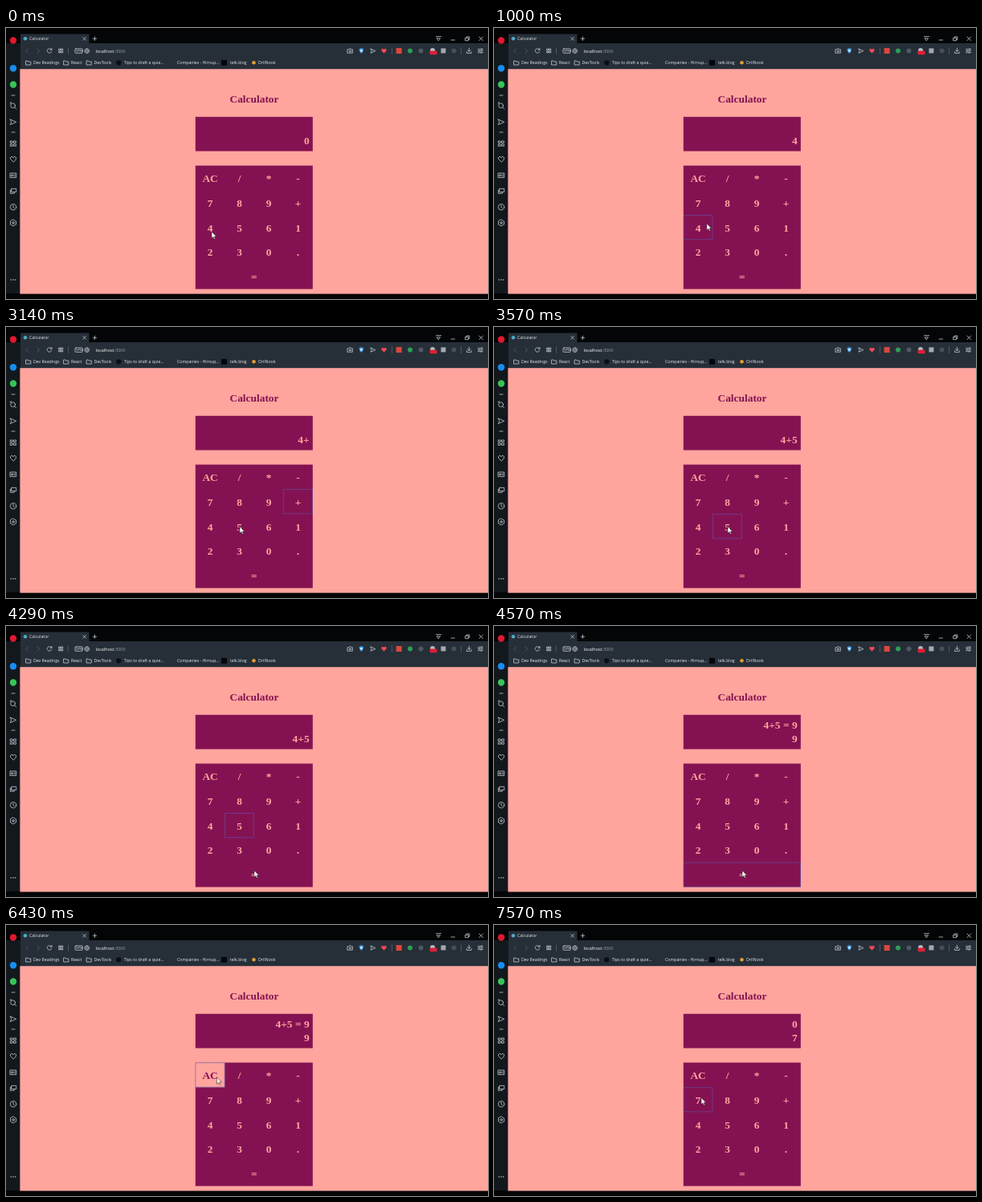
Write an HTML page that moves like this. It is 600 px wide and 338 px high and loops after 8 s.

```html
<!DOCTYPE html>
<html lang="en">
<head>
<meta charset="utf-8">
<title>Calculator</title>
<style>
html, body { margin: 0; width: 100%; height: 100%; overflow: hidden; background: #000; }
svg { display: block; width: 600px; height: 338px; }
.ui { font: 5.2px "Open Sans", "Noto Sans", sans-serif; fill: #e6e9ed; }
.calc { font: bold 13.4px "Liberation Serif", "Noto Serif", serif; }
.line { fill: none; stroke: #c3c8cf; stroke-width: .8; stroke-linejoin: round; stroke-linecap: round; }
.dim { stroke: #56606a; }
</style>
</head>
<body>
<svg id="stage" viewBox="0 0 600 338" xmlns="http://www.w3.org/2000/svg">
  <rect width="600" height="338" fill="#030506"/>
  <path d="M18 7.500h85.500V19H600v33H18z" fill="#262f38"/>
  <rect y="19" width="18" height="312" fill="#13181d"/>
  <rect x="17.400" y="51.200" width="582.600" height="280.400" fill="#ffa59e"/>

  <!-- tab strip and window buttons -->
  <circle cx="9" cy="15.500" r="4.200" fill="#e0182f"/>
  <circle cx="24" cy="13.300" r="2.300" fill="#4fa9c4"/>
  <text class="ui" x="29" y="15.200">Calculator</text>
  <g class="line">
    <path d="M95.800 11.600l3.600 3.600m0-3.600l-3.600 3.600M108.300 13.300h4.400m-2.200-2.200v4.400"/>
    <path d="M535.500 10.600h6M536.500 12.800h4l-2 2.800z"/>
    <path d="M554 15h4.600M572 12.300h3.600v3.400H572zM573.300 12.200v-1.300h3.600v3.500h-1.200M589 11l4.600 4.600m0-4.600l-4.600 4.600"/>
  </g>

  <!-- address bar -->
  <g class="line">
    <path class="dim" d="M27.300 25.800l-2.600 2.600 2.600 2.600M39 25.800l2.600 2.600-2.600 2.600"/>
    <path d="M56.600 27a2.800 2.800 0 1 0 .2 2.400M57 25.400v1.900h-1.900"/>
    <path d="M66 26h1.800v1.800H66zM69 26h1.800v1.800H69zM66 29h1.800v1.800H66zM69 29h1.800v1.800H69z"/>
    <path class="dim" d="M77.500 25v7M480.500 24.500v8M566.500 24.500v8"/>
    <rect x="86" y="25.900" width="9.400" height="5.400" rx="1"/>
    <circle cx="100.800" cy="28.600" r="2.800"/>
    <path d="M98 28.600h5.600M100.800 25.800q-2.400 2.800 0 5.600q2.400-2.800 0-5.600" stroke-width=".5"/>
    <path d="M425.300 26.800h1.400l.7-1h1.800l.7 1h1.500v4.400h-6.100z"/>
    <circle cx="428.300" cy="28.900" r="1.100"/>
    <path d="M454 26l5.800 2.600-5.800 2.600 1-2.600z"/>
    <path d="M576.400 25.200v4m-1.800-1.600l1.800 1.800 1.800-1.800M573.600 29.600v1.800h5.600v-1.800"/>
    <path d="M587.600 26.400h6M587.600 28.500h6M587.600 30.600h6M592 25.700v1.400M589 27.800v1.400M591.500 29.900v1.400"/>
  </g>
  <text class="ui" x="87.200" y="30.200" style="font-size:4px">VPN</text>
  <text class="ui" x="111.500" y="30.600" style="font-size:5.500px; fill:#fff">localhost<tspan fill="#98a0a8">:3000</tspan></text>
  <path d="M439.600 26l2.700-1 2.700 1q.2 4-2.700 5.800q-2.900-1.800-2.700-5.800z" fill="#3f9be0"/>
  <circle cx="442.300" cy="28.200" r="1.300" fill="#e8f2fb"/>
  <path d="M470.500 31.400l-3-3q-.8-2 1.100-2.600q1.300-.1 1.900 1.100q.6-1.200 1.900-1.100q1.900.6 1.100 2.600z" fill="#f04a58"/>
  <rect x="485.600" y="25" width="7" height="7" fill="#d9483c"/>
  <circle cx="503" cy="28.500" r="3" fill="#2f9e55"/>
  <circle cx="516.500" cy="28.500" r="3" fill="#4f5862"/>
  <circle cx="531" cy="28" r="3" fill="#b7bac2"/>
  <rect x="527.500" y="28.600" width="9" height="4.600" rx="1" fill="#dd2034"/>
  <rect x="541.400" y="25.400" width="6" height="6" fill="#a5a9b0"/>
  <circle cx="557.500" cy="28.500" r="3" fill="#444e58"/>

  <!-- bookmarks -->
  <g id="marks"></g>
  <circle cx="140.300" cy="43.300" r="3.100" fill="#0a0d12"/>
  <rect x="268" y="39.800" width="7" height="7" fill="#05070a"/>
  <circle cx="308.500" cy="43.300" r="2.300" fill="#e39a36"/>

  <!-- sidebar -->
  <circle cx="9" cy="50.300" r="4.200" fill="#168df0"/>
  <circle cx="9" cy="70.500" r="4.200" fill="#38c456"/>
  <g class="line">
    <path d="M7 84h4M7 130h4"/>
    <circle cx="8.600" cy="96.800" r="2.900"/><path d="M10.700 98.900l2 2M5.400 94v-1h1.500"/>
    <path d="M5.300 114l7.400 3.300-7.400 3.300 1.300-3.300z"/>
    <path d="M5.600 141h2.500v2.300H5.600zM9.900 141h2.500v2.300H9.900zM5.600 145h2.500v2.300H5.600zM9.900 145h2.500v2.300H9.900z"/>
    <path d="M9 167l-3.400-3.400q-1-2.500 1.300-3.200q1.600 0 2.100 1.500q.5-1.500 2.100-1.500q2.300.7 1.300 3.200z"/>
    <path d="M5.400 181h7.300v5.600H5.400zM7 183h1.800v1.700H7zM10.300 183h1M10.300 184.700h1"/>
    <path d="M7 200.400h5.700v4.200H7zM7 202.300H5.300v4h5v-1.600"/>
    <circle cx="9" cy="223.300" r="3.700"/><path d="M9 221v2.500l1.500 1"/>
    <path d="M9 239l3.500 2v4L9 247l-3.500-2v-4z"/><circle cx="9" cy="243" r="1.300"/>
  </g>
  <g fill="#c5c9d0"><circle cx="6.300" cy="314" r=".8"/><circle cx="9" cy="314" r=".8"/><circle cx="11.700" cy="314" r=".8"/></g>

  <!-- calculator -->
  <g class="calc" fill="#841252">
    <text x="309" y="92.500" text-anchor="middle">Calculator</text>
    <rect x="235.800" y="110.800" width="146" height="42.800"/>
    <rect x="235.800" y="171.600" width="146" height="154"/>
  </g>
  <g class="calc" fill="#ffa59e" text-anchor="end">
    <text id="top" x="377.600" y="127.700"/>
    <text id="low" x="377.600" y="144.700"/>
  </g>
  <rect id="lit" fill="#ffa59e"/>
  <g id="keys" class="calc" text-anchor="middle"></g>
  <rect id="ring" fill="none" stroke="#5468c6" stroke-width=".9" stroke-dasharray="1 1"/>
  <path id="hand" d="M0 0v8.200l1.900-1.700 1.300 2.800 1.300-.6-1.300-2.700h2.600z" fill="#fff" stroke="#161616" stroke-width=".5"/>
</svg>
<script>
const PINK = "#ffa59e", PLUM = "#841252";
const TICK = 1000 / 7, LOOP = 8000;
const $ = id => document.getElementById(id);

function add(parent, tag, attrs, text = "") {
  const el = document.createElementNS("http://www.w3.org/2000/svg", tag);
  for (const name in attrs) el.setAttribute(name, attrs[name]);
  el.textContent = text;
  return parent.appendChild(el);
}

// bookmark: label, text x, folder or not
[["Dev Readings", 34, 1], ["React", 81, 1], ["DevTools", 109.5, 1],
 ["Tips to draft a quie...", 147, 0], ["Companies - Hirnup...", 213, 0],
 ["telk.blog", 279, 0], ["DrilNook", 314, 0]].forEach(([label, x, folder]) => {
  add($("marks"), "text", { class: "ui", x, y: 45.2 }, label);
  if (folder) add($("marks"), "path", { class: "line", d: `M${x - 9} 41h2l.8 1h3v4h-5.8z` });
});

const LEFT = 235.8, TOP = 171.6, KEY_W = 36.5, KEY_H = 30.8, keys = {};
["AC", "/", "*", "-", "7", "8", "9", "+", "4", "5", "6", "1", "2", "3", "0", ".", "="].forEach((name, i) => {
  const x = LEFT + i % 4 * KEY_W, y = TOP + Math.floor(i / 4) * KEY_H;
  const w = name === "=" ? KEY_W * 4 : KEY_W;
  const label = add($("keys"), "text", { x: x + w / 2, y: y + 20.3, fill: PINK }, name);
  keys[name] = { x, y, w, label };
});

// key, tick down, tick up, upper line, lower line
const presses = [
  ["4", 5, 6, "", "4"],
  ["+", 14, 15, "", "4+"],
  ["5", 24, 25, "", "4+5"],
  ["=", 31, 32, "4+5 = 9", "9"],
  ["AC", 45, 46, "0", "0"],
  ["7", 50, 53, "0", "7"]
];

// pointer stops: tick, x, y
const path = [
  [0, 256, 254], [3, 257, 246], [6, 257, 246], [12, 363, 218.5], [16, 363, 218.5],
  [22, 291, 249], [25, 291, 249], [30, 309, 305], [38, 309, 305],
  [43, 262.5, 190], [47, 262.5, 190], [49, 258, 215.5], [56, 258, 215.5]
];

function pointer(tick) {
  const i = path.findIndex(p => p[0] > tick);
  const [t0, x0, y0] = path[i - 1], [t1, x1, y1] = path[i];
  const u = (tick - t0) / (t1 - t0), e = u * u * (3 - 2 * u);
  return [x0 + (x1 - x0) * e, y0 + (y1 - y0) * e];
}

function box(el, key, inset) {
  el.setAttribute("visibility", key ? "visible" : "hidden");
  if (!key) return;
  el.setAttribute("x", key.x + inset);
  el.setAttribute("y", key.y + inset);
  el.setAttribute("width", key.w - inset * 2);
  el.setAttribute("height", KEY_H - inset * 2);
}

function draw(ms) {
  const tick = Math.floor((ms % LOOP + 3) / TICK) % 56;
  let top = "", low = "0", focus = null, held = null;
  for (const [name, down, up, a, b] of presses) {
    if (tick < down) break;
    focus = keys[name];
    held = tick < up ? focus : null;
    if (!held) [top, low] = [a, b];
  }
  $("top").textContent = top;
  $("low").textContent = low;
  for (const key of Object.values(keys)) key.label.setAttribute("fill", key === held ? PLUM : PINK);
  box($("lit"), held, 0);
  box($("ring"), focus, 0.3);
  $("hand").setAttribute("transform", `translate(${pointer(tick)})`);
}

const start = performance.now();
function frame() {
  draw(performance.now() - start);
  requestAnimationFrame(frame);
}
frame();
</script>
</body>
</html>
```
